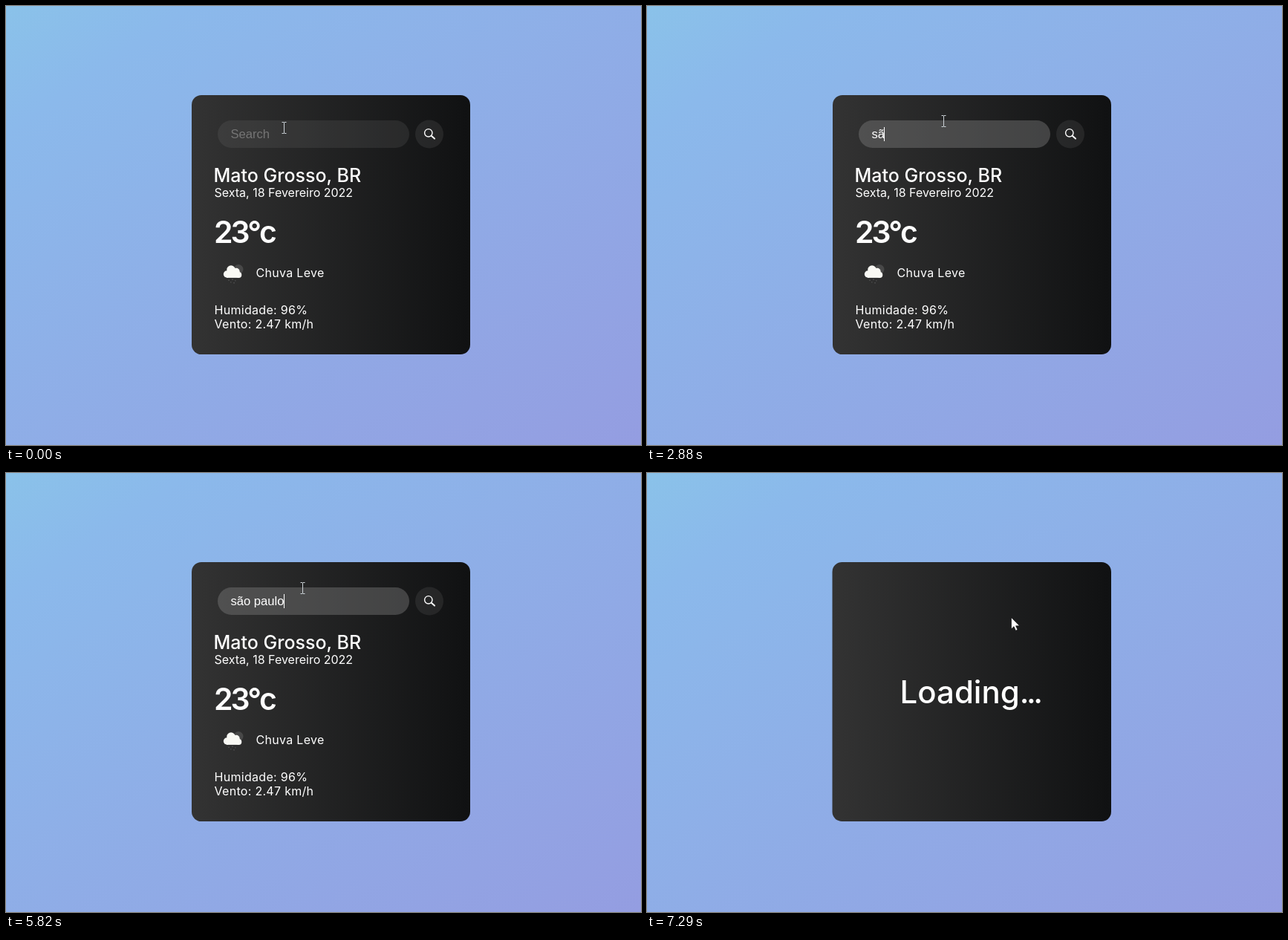
These frames come from a looping animation (855 by 591 pixels, 8 s). An HTML page:

```html
<!DOCTYPE html>
<html lang="pt-BR">
<head>
<meta charset="utf-8">
<title>Weather card</title>
<style>
html, body { margin: 0; width: 100%; height: 100%; overflow: hidden; }
body { background: linear-gradient(to bottom right, #8ac2e9, #8bb9eb 14.5%, #949de1); }
svg { display: block; width: 855px; height: 591px; }
text { font: 16px Inter, sans-serif; fill: #fff; white-space: pre; }
.field { font: 16.6px "Liberation Sans", Arial, sans-serif; }
.city { font-size: 25px; font-weight: 500; }
.temp { font-size: 41px; font-weight: 600; letter-spacing: -3px; }
.loading { font-size: 42px; font-weight: 500; }
.dots { letter-spacing: -3.5px; }
.wide { letter-spacing: .3px; }
</style>
</head>
<body>
<svg viewBox="0 0 855 591">
  <defs>
    <linearGradient id="dark">
      <stop stop-color="#333"/>
      <stop offset="1" stop-color="#101112"/>
    </linearGradient>
  </defs>
  <rect id="card" x="250" y="120" width="375" height="349" rx="13" fill="url(#dark)"/>

  <g id="weather">
    <rect id="pill" x="285" y="154" width="258" height="37" rx="18.5" fill="#7c7c7c"/>
    <text id="hint" class="field" x="302.4" y="178" style="fill:#757575">Search</text>
    <text id="typed" class="field" x="302.4" y="178"></text>
    <path id="squiggle" d="M333.5 180.5l2-1.5 2 1.5 2-1.5 2 1.5 2-1.5 2 1.5 2-1.5 2 1.5 2-1.5 2 1.5 2-1.5 2 1.5 2-1.5 2 1.5 2-1.5 2 1.5 2-1.5 2 1.5 2-1.5 2 1.5" fill="none" stroke="#e01818" stroke-width="1.1"/>
    <rect id="caret" y="163" width="1" height="19" fill="#fff"/>

    <circle cx="570" cy="172.5" r="19" fill="#7c7c7c" fill-opacity=".168"/>
    <g fill="none" stroke="#fff">
      <circle cx="568.8" cy="170.8" r="5.2" stroke-width="1.4"/>
      <path d="M573 175l4 3.600" stroke-width="2" stroke-linecap="round"/>
    </g>

    <text class="city" x="279.5" y="237">Mato Grosso, BR</text>
    <text x="280.5" y="257">Sexta, 18 Fevereiro 2022</text>
    <text class="temp" x="280" y="319">23°c</text>

    <g fill="#484848">
      <circle cx="313" cy="354.5" r="6.5"/>
      <path d="M299 368.5h2v1.5h-2zM304 367.5h2v1.5h-2zM308 369h1.5v1.5h-1.5zM302 371h1.5v1.5h-1.5zM306 372h2v1.5h-2z"/>
    </g>
    <g fill="#f9f9f4">
      <circle cx="303" cy="355" r="5.8"/>
      <circle cx="310" cy="357.500" r="4.7"/>
      <circle cx="297.500" cy="361" r="4.700"/>
      <circle cx="313.300" cy="362" r="4"/>
      <rect x="297" y="358" width="17" height="7.900"/>
    </g>
    <g class="wide">
      <text x="336.5" y="365">Chuva Leve</text>
      <text x="280.5" y="415">Humidade: 96%</text>
      <text x="280.5" y="434">Vento: 2.47 km/h</text>
    </g>
  </g>

  <text id="loading" class="loading" x="340.5" y="310">Loading<tspan class="dots">...</tspan></text>

  <path id="beam" d="M-3 -7.5h2.500l.5 .5 .5 -.5h2.500M0 -7v14M-3 7.500h2.500l.5 -.5 .5 .5h2.500" fill="none" stroke="#ccd3d8"/>
  <path id="arrow" d="M.5 .5v15.500l3.500-3.300 2.500 5.500 2.500-1.100-2.400-5.300h5z" fill="#fff" stroke="#000" stroke-width=".6"/>
</svg>
<script>
const LOOP = 8000, LOADING_AT = 7290;
const el = id => document.getElementById(id);

// [time, field text, caret visible]
const edits = [
  [0, '', 0], [204, '', 1], [740, '', 0], [1290, '', 1], [1820, '', 0], [2350, '', 1],
  [2550, 's', 1], [2880, 'sã', 1], [3080, 'são', 1], [3280, 'são ', 1],
  [3740, 'são o', 1], [4270, 'são ', 0], [4750, 'são p', 1], [4950, 'são pa', 1],
  [5220, 'são pau', 1], [5620, 'são paul', 1], [5820, 'são paulo', 1],
  [6350, 'são paulo', 0], [6880, 'são paulo', 1]
];

const show = (id, on) => el(id).style.display = on ? '' : 'none';
const clamp = v => Math.min(1, Math.max(0, v));
const bezier = (a, b, c, u) => a * (1 - u) ** 2 + 2 * b * u * (1 - u) + c * u * u;

// Progress in n jumps, the first at start and the last at end
const stepped = (t, start, end, n) =>
  clamp(Math.floor((t - start) / (end - start) * (n - 1) + 1.001) / n);

function pointer(t) {
  if (t < 6550) {
    const u = stepped(t, 70, 540, 8);
    return [bezier(374, 380, 399, u), bezier(164, 194, 155, u)];
  }
  const u = stepped(t, 6550, 6890, 6), s = u * u * (3 - 2 * u);
  return [399 + 91 * s, 155 + 39 * s];
}

function draw(t) {
  const busy = t >= LOADING_AT;
  const [, text, caretOn] = edits.findLast(e => e[0] <= t);
  show('weather', !busy);
  show('loading', busy);
  el('card').setAttribute('x', busy ? 249.5 : 250);
  el('card').setAttribute('width', busy ? 375.5 : 375);

  if (!busy) {
    const typed = el('typed');
    if (typed.textContent !== text) typed.textContent = text;
    const width = text ? typed.getComputedTextLength() : 0;
    el('caret').setAttribute('x', Math.floor(302.4 + width));
    el('pill').setAttribute('fill-opacity', .168 + .26 * clamp((t - 140) / 340));
    show('caret', caretOn);
    show('hint', !text);
    show('squiggle', t >= 6550);
  }

  const [x, y] = pointer(t).map(Math.round);
  const inField = y < 191;
  show('beam', inField);
  show('arrow', !inField);
  el('beam').setAttribute('transform', `translate(${x + .5} ${y})`);
  el('arrow').setAttribute('transform', `translate(${x} ${y})`);
}

const begin = performance.now();
function tick() {
  draw((performance.now() - begin) % LOOP);
  requestAnimationFrame(tick);
}
tick();
</script>
</body>
</html>
```
